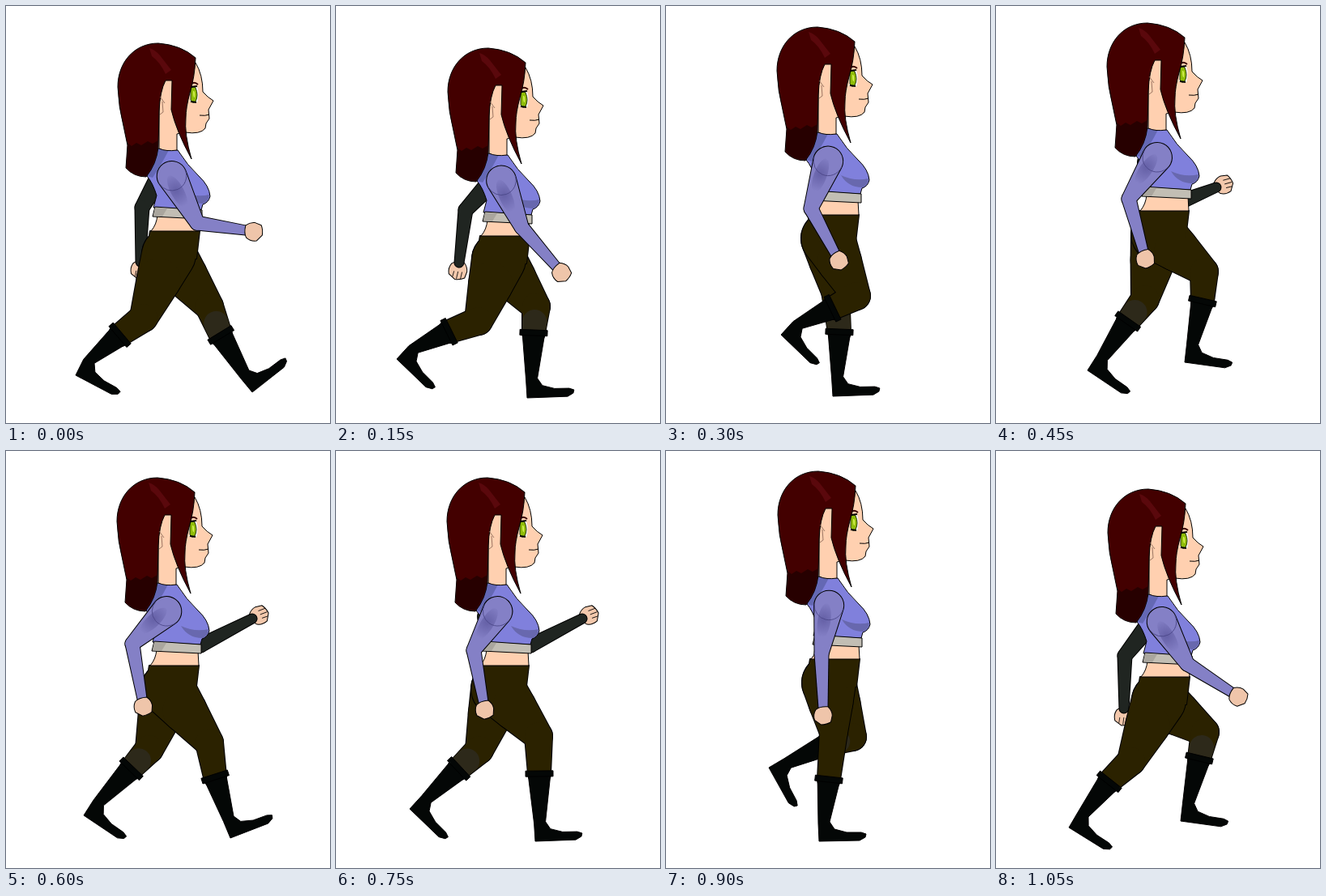
Animation of 400x515 px, one loop 1.2 s. Source, as an HTML page with a canvas:

```html
<!DOCTYPE html>
<html lang="en">
<head>
<meta charset="utf-8">
<title>Walk cycle</title>
<style>
html, body { margin: 0; width: 100%; height: 100%; overflow: hidden; background: #fff; }
canvas { display: block; }
</style>
</head>
<body>
<canvas id="stage" width="400" height="515"></canvas>
<script>
const ctx = document.getElementById('stage').getContext('2d');
const STEP = 150;
const PANTS = '#2b2200', SKIN = '#ffd0b0', LINE = '#000', BOOT = '#040706';
const SLEEVE = '#8480c6', DARK_SLEEVE = '#202521';

// One entry per step of the walk.
const bob = [[0, 0], [0, 6], [-1, -20], [-1, -25], [-1, -13], [-1, -13], [0, -21], [0, 1]];

// Legs: knee x,y, boot top x,y, heel x,y, sole angle in degrees.
const nearLegs = [
  [170, 385, 141, 406, 86, 456, 29],
  [176, 389, 140, 402, 75, 436, 45],
  [235, 358, 206, 373, 142, 406, 45],
  [257, 328, 255, 364, 233, 440, 9],
  [251, 360, 258, 402, 277, 478, -20],
  [250, 352, 251, 398, 246, 482, -1],
  [207, 347, 201, 405, 189, 482, 0],
  [167, 383, 140, 408, 90, 465, 33]
];
const farLegs = [
  [251, 371, 265, 406, 304, 477, -37],
  [247, 371, 244, 403, 236, 484, -1],
  [209, 352, 214, 402, 206, 482, -1],
  [184, 362, 163, 389, 113, 450, 35],
  [177, 368, 155, 392, 96, 450, 35],
  [177, 369, 152, 392, 91, 442, 45],
  [230, 353, 200, 362, 127, 391, 62],
  [258, 347, 251, 379, 228, 457, 9]
];

// Arms: elbow x,y, wrist x,y. A null arm is hidden behind the body.
const nearArms = [
  [236, 268, 296, 277], [229, 273, 272, 322], [179, 250, 209, 306], [164, 238, 182, 303],
  [156, 238, 168, 306], [170, 246, 182, 310], [192, 250, 194, 317], [236, 263, 291, 298]
];
const farArms = [
  [168, 249, 166, 316], [160, 252, 152, 317], null, [232, 240, 272, 224],
  [240, 240, 304, 207], [240, 240, 304, 207], null, [159, 253, 158, 318]
];

function paint(path, fill, line = LINE, width = 1) {
  const shape = typeof path === 'string' ? new Path2D(path) : path;
  if (fill) { ctx.fillStyle = fill; ctx.fill(shape); }
  if (line) { ctx.strokeStyle = line; ctx.lineWidth = width; ctx.stroke(shape); }
}

function polygon(points) {
  const path = new Path2D();
  points.forEach(p => path.lineTo(...p));
  path.closePath();
  return path;
}

// Two circles joined by their outer tangents.
function taper([x1, y1, r1], [x2, y2, r2]) {
  const angle = Math.atan2(y2 - y1, x2 - x1);
  const ratio = (r1 - r2) / Math.hypot(x2 - x1, y2 - y1);
  const spread = Math.acos(Math.max(-1, Math.min(1, ratio)));
  const path = new Path2D();
  path.arc(x1, y1, r1, angle + spread, angle - spread + 2 * Math.PI);
  path.arc(x2, y2, r2, angle - spread, angle + spread);
  path.closePath();
  return path;
}

// Shapes that share one common outline.
function merged(paths, fill) {
  paths.forEach(p => paint(p, null, LINE, 2));
  paths.forEach(p => paint(p, fill, null));
}

const mix = (a, b, t) => a.map((v, i) => v + (b[i] - v) * t);

function drawBoot(tx, ty, hx, hy, degrees) {
  const a = degrees * Math.PI / 180, c = Math.cos(a), s = Math.sin(a);
  const foot = [[-1, -22], [0, 0], [50, -1], [57, -5], [58, -9], [52, -11], [34, -11], [19, -15], [13, -24]]
    .map(([x, y]) => [hx + x * c - y * s, hy + x * s + y * c]);
  const ankle = mix(foot[0], foot[8], 0.5);
  const dx = ankle[0] - tx, dy = ankle[1] - ty, len = Math.hypot(dx, dy);
  const at = (side, down) => [tx + (side * dy + down * dx) / len, ty + (down * dy - side * dx) / len];
  paint(polygon([at(-14, 0), ...foot, at(14, 0)]), BOOT);
  paint(polygon([at(-17, -3), at(17, -3), at(17, 4), at(-17, 4)]), BOOT);
}

function drawLeg([kx, ky, tx, ty, hx, hy, sole], [dx, dy], far) {
  const hip = [201 + dx, 307 + dy, 33], knee = [kx, ky, 17], cuff = [tx, ty, 14];
  const thigh = mix(hip, knee, 0.4);
  thigh[2] = 27;
  const parts = [taper(hip, thigh), taper(thigh, knee), taper(knee, cuff)];
  if (!far) parts.push(polygon([[178, 278], [239, 278], [235, 312], [172, 312]].map(([x, y]) => [x + dx, y + dy])));
  merged(parts, PANTS);
  if (far) paint(taper(mix(knee, cuff, 0.6), cuff), '#2d291a', null);
  drawBoot(tx, ty, hx, hy, sole);
}

function drawHand(x, y, angle, fingers) {
  ctx.save();
  ctx.translate(x, y);
  ctx.rotate(angle);
  paint('M-1-6 Q4-11 10-11 L18-9 Q21-4 21 3 L15 11 Q8 13 2 9 Q-2 4-1-6Z', fingers ? '#f3c8ac' : '#efc5aa');
  if (fingers) paint('M20-4 L11-5 M20 1 L11 0 M18 6 L11 5', null, LINE, 0.8);
  ctx.restore();
}

function drawArm(arm, dy, far) {
  if (!arm) return;
  const [ex, ey, wx, wy] = arm;
  const shoulder = far ? [186, 218 + dy, 11] : [202 + (ex - 202) * 0.08, 210 + dy * 0.92, 18];
  const elbow = [ex, ey, 8.5], wrist = [wx, wy, 5.5];
  const angle = Math.atan2(wy - ey, wx - ex);
  if (far) drawHand(wx, wy, angle, true);
  merged([taper(shoulder, elbow), taper(elbow, wrist)], far ? DARK_SLEEVE : SLEEVE);
  if (far) return;
  const upper = Math.atan2(ey - shoulder[1], ex - shoulder[0]);
  ctx.save();
  ctx.translate(shoulder[0], shoulder[1]);
  ctx.rotate(upper);
  const shade = ctx.createRadialGradient(18, 4, 2, 18, 4, 22);
  shade.addColorStop(0, 'rgba(80,75,145,.55)');
  shade.addColorStop(1, 'rgba(80,75,145,0)');
  ctx.fillStyle = shade;
  ctx.beginPath();
  ctx.ellipse(20, 3, 22, 8, 0, 0, 7);
  ctx.fill();
  ctx.beginPath();
  ctx.arc(0, 0, 18, -1.5, 1.5);
  ctx.strokeStyle = '#4b4788';
  ctx.lineWidth = 0.8;
  ctx.stroke();
  ctx.restore();
  drawHand(wx, wy, angle, false);
}

function drawTorso() {
  paint('M187 258 Q186 270 179 278 H239 L238 260Z', SKIN);
  paint('M188 176 L212 178 Q224 197 238 210 Q251 222 252 235 Q250 243 243 245 L241 252 L182 249 L186 234 Q181 218 174 210Z', '#8080dc');
  paint('M188 177 L201 178 Q190 199 181 212 L175 210Z', '#6468b4', null);
  paint('M217 229 Q234 237 251 233 Q250 243 243 244 Q226 244 217 229Z', '#6868ae', null);
  paint('M184 248 L242 252 V263 L181 260Z', '#c2beb4');
  paint('M184 249 L199 250 L193 260 L182 259Z', '#aaa69e', null);
}

function drawHead() {
  paint('M189 85 V176 Q198 180 211 178 V158 L221 156 Q240 159 246 151 L247 145 L251 139 L250 128 L256 117 Q249 113 243 106 Q243 85 234 70Z', SKIN);
  paint('M239 135 Q246 136 251 134', null);
  // Eye and brow
  paint('M227 101 L236 100 Q239 109 236 119 L227 118Z', '#fff', null);
  paint('M228 102 Q231 98 234 101 Q238 110 234 118 Q230 121 228 116Z', '#8fbd08', '#263000');
  paint('M231 105 Q234 104 233 113 Q231 114 231 105Z', '#d2ef50', null);
  paint('M226 103 L229 100 L236 99 M228 118 L235 119', null, LINE, 2);
  paint('M229 96 Q233 93 237 97', null, '#350000', 1.8);
  // Hair
  paint('M188 46 C158 46 138 70 138 100 Q139 125 145 148 L150 172 L148 200 Q158 211 173 211 Q186 195 188 174 L189 130 Q190 105 197 92 L205 92 L204 128 Q210 154 229 189 Q220 158 222 138 Q222 126 227 107 Q233 88 234 64 Q216 48 188 46Z', '#430000');
  paint('M150 169 L155 173 L161 169 L167 172 L175 167 L181 170 L188 166 Q188 188 173 210 Q157 210 149 199Z', '#270000', null);
  paint('M177 52 Q184 54 190 61 L204 79 L197 84 Q190 69 180 62Z', '#5a080c', null);
  paint('M190 112 L196 120 M193 118 L194 131 L190 134', null, '#806050', 0.8);
}

function drawPose(i) {
  ctx.fillStyle = '#fff';
  ctx.fillRect(0, 0, 400, 515);
  ctx.lineJoin = 'round';
  const [dx, dy] = bob[i];
  drawArm(farArms[i], dy, true);
  drawLeg(farLegs[i], bob[i], true);
  drawLeg(nearLegs[i], bob[i], false);
  ctx.save();
  ctx.translate(dx, dy);
  drawTorso();
  drawHead();
  ctx.restore();
  drawArm(nearArms[i], dy, false);
}

const start = performance.now();
function tick() {
  const elapsed = Math.max(0, performance.now() - start);
  drawPose(Math.floor(elapsed / STEP) % bob.length);
  requestAnimationFrame(tick);
}
tick();
</script>
</body>
</html>
```
